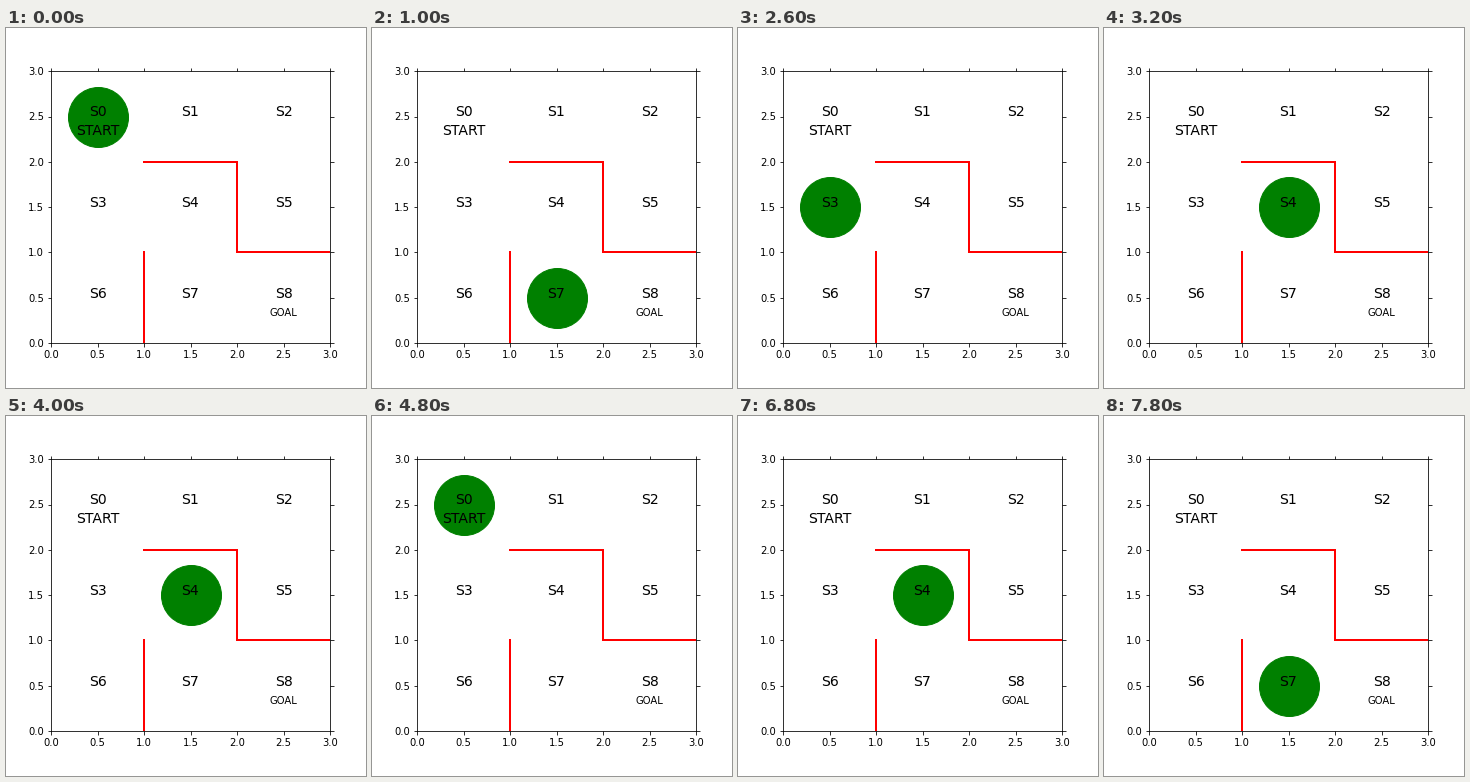
A matplotlib script for the animation above (8000 ms loop, 360 by 360 pixels).

```python
import matplotlib.pyplot as plt
from matplotlib.animation import FuncAnimation

plt.rcParams["font.family"] = "DejaVu Sans"

STEP_MS = 200
# Cell visited at each step; cells are numbered row by row from the top left.
ROUTE = "0347474743" "4743034747" "4743034743" "0303474747"
WALLS = [([1, 1], [0, 1]), ([1, 2], [2, 2]), ([2, 2], [2, 1]), ([2, 3], [1, 1])]


def center(cell):
    row, col = divmod(cell, 3)
    return col + 0.5, 2.5 - row


fig = plt.figure(figsize=(5, 5), dpi=72, facecolor="white")
ax = fig.add_axes([0.125, 0.125, 0.775, 0.755])
ax.set_xlim(0, 3)
ax.set_ylim(0, 3)
ticks = [i / 2 for i in range(7)]
ax.set_xticks(ticks)
ax.set_yticks(ticks)
ax.tick_params(top=True, right=True)

for xs, ys in WALLS:
    ax.plot(xs, ys, color="red", linewidth=2)

for cell in range(9):
    ax.text(*center(cell), f"S{cell}", size=14, ha="center")
ax.text(0.5, 2.3, "START", size=14, ha="center")
ax.text(2.5, 0.3, "GOAL", size=10, ha="center")

agent, = ax.plot([0.5], [2.5], marker="o", color="g", markersize=60)


def update(step):
    x, y = center(int(ROUTE[step]))
    agent.set_data([x], [y])
    return agent,


anim = FuncAnimation(fig, update, frames=len(ROUTE), interval=STEP_MS,
                     repeat=True, repeat_delay=0)
plt.show()
```
